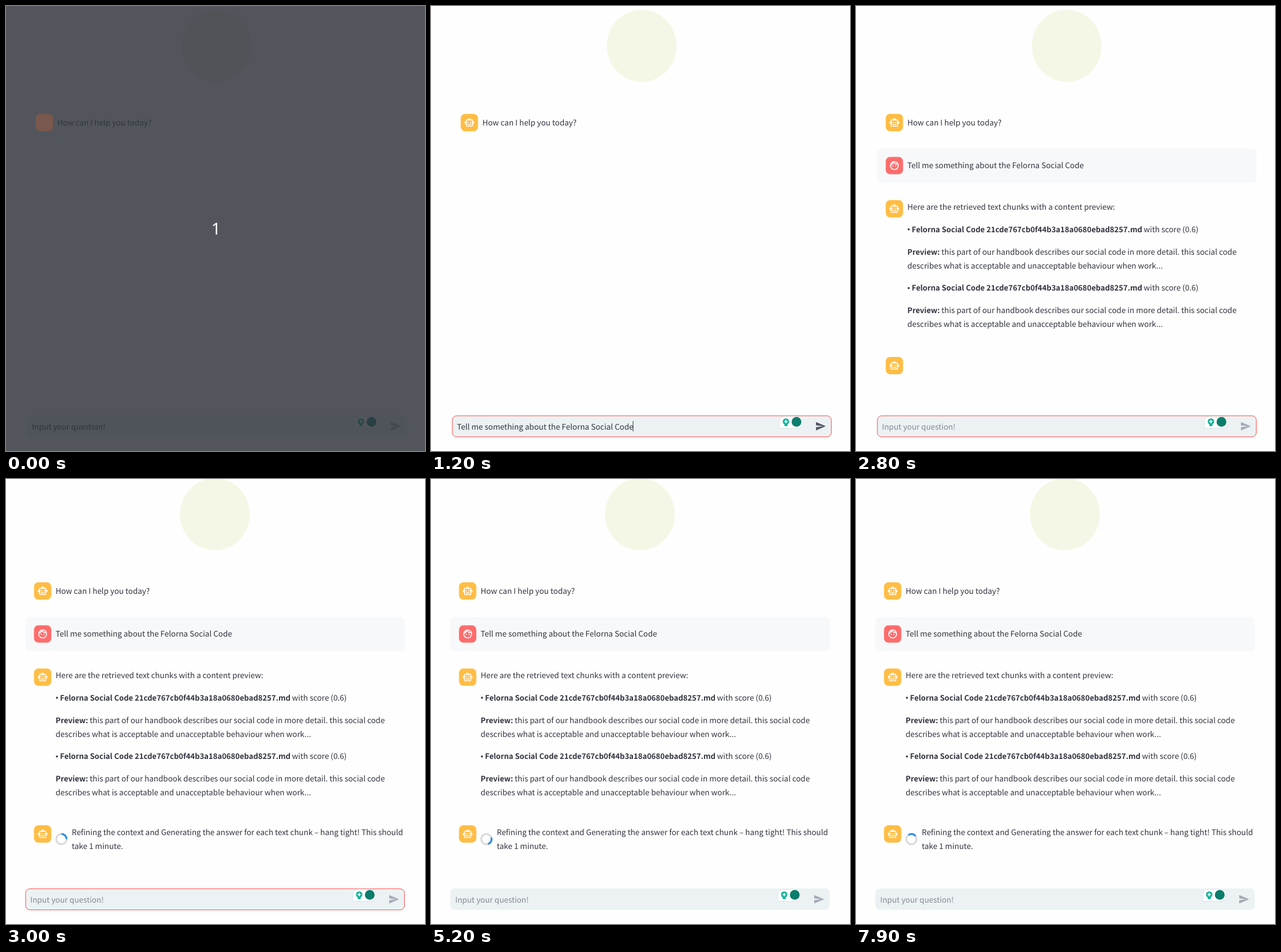
Write an HTML page that moves like this. It is 726 px wide and 771 px high and loops after 8 s.

```html
<!DOCTYPE html>
<html lang="en">
<head>
<meta charset="utf-8">
<title>Chat assistant</title>
<style>
  html, body { margin: 0; width: 100%; height: 100%; overflow: hidden; background: #fefefe; }
  svg { display: block; width: 726px; height: 771px; }
  text {
    font: 13.43px "Noto Sans CJK SC", "Noto Sans CJK JP", "Noto Sans CJK", "Noto Sans", sans-serif;
    fill: #31333f;
    text-rendering: geometricPrecision;
    white-space: pre;
  }
  .bold { font-size: 13.05px; font-weight: 700; }
  .hint { fill: #858994; }
  .count { font: 500 28.5px "Noto Sans", sans-serif; fill: #fff; text-anchor: middle; }

  /* One 8 s timeline: 1.25% is 100 ms. */
  .timed { animation: 8s step-end infinite; }
  .veil { animation-name: veil; }
  .page { animation-name: page; }
  .scroll { animation-name: scroll; }
  .focus { animation-name: focus; }
  .empty { animation-name: empty; }
  .filled { animation-name: filled; }
  .caret { animation-name: caret; }
  .asked { animation-name: asked; }
  .thinking { animation-name: thinking; }
  .chunks { animation-name: chunks; }
  .answer { animation-name: answer; }
  .refining { animation-name: refining; }
  .spin { animation: spin 1s steps(10) infinite; transform-origin: 99px 632px; }

  @keyframes veil { 0% { opacity: 1 } 1.25%, 100% { opacity: 0 } }
  @keyframes page { 0% { transform: none } 36.25%, 100% { transform: translateX(-3px) } }
  @keyframes scroll { 0% { transform: none } 37.5%, 100% { transform: translateY(-8px) } }
  @keyframes focus {
    0% { opacity: 0 } 6.25% { opacity: .35 } 7.5% { opacity: .75 } 8.75% { opacity: 1 }
    52.5% { opacity: .7 } 53.75% { opacity: .3 } 55%, 100% { opacity: 0 }
  }
  @keyframes empty { 0% { opacity: 1 } 12.5% { opacity: 0 } 26.25%, 100% { opacity: 1 } }
  @keyframes filled { 0% { opacity: 0 } 12.5% { opacity: 1 } 26.25%, 100% { opacity: 0 } }
  @keyframes caret {
    0% { opacity: 0; transform: none }
    6.25% { opacity: 1; transform: none }
    12.5% { opacity: 1; transform: translateX(305px) }
    18.75% { opacity: 0; transform: translateX(305px) }
    25% { opacity: 1; transform: translateX(305px) }
    26.25% { opacity: 1; transform: none }
    32.5% { opacity: 0; transform: none }
    38.75% { opacity: 1; transform: none }
    45% { opacity: 0; transform: none }
    51.25% { opacity: 1; transform: none }
    52.5%, 100% { opacity: 0; transform: none }
  }
  @keyframes asked { 0% { opacity: 0 } 26.25%, 100% { opacity: 1 } }
  @keyframes thinking { 0% { opacity: 0 } 28.75%, 100% { opacity: 1 } }
  @keyframes chunks { 0% { opacity: 0 } 32.5%, 100% { opacity: 1 } }
  @keyframes answer { 0% { opacity: 0 } 33.75%, 100% { opacity: 1 } }
  @keyframes refining { 0% { opacity: 0 } 36.25%, 100% { opacity: 1 } }
  @keyframes spin { from { transform: rotate(45deg) } to { transform: rotate(405deg) } }
</style>
</head>
<body>
<svg viewBox="0 0 726 771">
  <defs>
    <g id="bot">
      <rect x="-15" y="-15" width="30" height="30" rx="7.5" fill="#ffbd45"/>
      <g transform="scale(.77) translate(-12 -12)" fill="#fff">
        <path d="M20 9V7c0-1.1-.9-2-2-2h-3c0-1.66-1.34-3-3-3S9 3.34 9 5H6c-1.1 0-2 .9-2 2v2c-1.66 0-3 1.34-3 3s1.34 3 3 3v4c0 1.1.9 2 2 2h12c1.1 0 2-.9 2-2v-4c1.66 0 3-1.34 3-3s-1.34-3-3-3zm-2 10H6V7h12z"/>
        <circle cx="9" cy="11.5" r="1.5"/>
        <circle cx="15" cy="11.5" r="1.5"/>
        <path d="M8 15h8v2H8z"/>
      </g>
    </g>
    <g id="person">
      <rect x="-15" y="-15" width="30" height="30" rx="7.5" fill="#ff6c6c"/>
      <g transform="scale(.77) translate(-12 -12)" fill="none" stroke="#fff" stroke-width="2">
        <circle cx="12" cy="12" r="9"/>
        <path d="M3.5 11Q8.5 9 10 4Q13 9.5 20.5 9"/>
        <g fill="#fff" stroke="none"><circle cx="9" cy="13" r="1.3"/><circle cx="15" cy="13" r="1.3"/></g>
      </g>
    </g>
    <g id="chunk">
      <circle cx="91.3" cy="387" r="1.8" fill="#31333f"/>
      <text x="96.5" y="391.5" class="bold">Felorna Social Code 21cde767cb0f44b3a18a0680ebad8257.md</text>
      <text x="498.5" y="391.5">with score (0.6)</text>
      <text x="89" y="430.5" class="bold">Preview:</text>
      <text x="148" y="430.5">this part of our handbook describes our social code in more detail. this social code</text>
      <text x="89" y="454.7">describes what is acceptable and unacceptable behaviour when work...</text>
    </g>
    <path id="send" d="M2 3L23 12L2 21V14L17 12L2 10Z" transform="translate(665.4 718.4) scale(.81)"/>
  </defs>

  <rect width="726" height="771" fill="#fefefe"/>

  <g class="timed page">
    <g class="timed scroll">
      <ellipse cx="365" cy="69" rx="60.5" ry="62.5" fill="#f5f7e6"/>

      <use href="#bot" x="66.5" y="202"/>
      <text x="89" y="206.5">How can I help you today?</text>

      <g class="timed asked">
        <rect x="36.5" y="247" width="657.5" height="59.5" rx="7.5" fill="#f7f8f9"/>
        <use href="#person" x="66.5" y="276.5"/>
        <text x="89" y="281.3">Tell me something about the Felorna Social Code</text>
      </g>

      <use class="timed thinking" href="#bot" x="66.5" y="351.3"/>
      <g class="timed chunks">
        <text x="89" y="353.3">Here are the retrieved text chunks with a content preview:</text>
        <use href="#chunk"/>
        <use href="#chunk" y="101.7"/>
      </g>

      <use class="timed answer" href="#bot" x="66.5" y="623"/>
      <g class="timed refining">
        <g class="spin" fill="none" stroke-width="2.8">
          <circle cx="99" cy="632" r="9" stroke="#d6d6d9"/>
          <path d="M92.64 625.64A9 9 0 0 1 105.36 625.64" stroke="#1c83e1"/>
        </g>
        <text x="117" y="625">Refining the context and Generating the answer for each text chunk – hang tight! This should</text>
        <text x="117" y="649">take 1 minute.</text>
      </g>
    </g>

    <rect x="36.5" y="709.5" width="657.5" height="37" rx="7.5" fill="#ecf2f3"/>
    <rect class="timed focus" x="37" y="710" width="656.5" height="36.5" rx="7.5" fill="none" stroke="#ff4b4b"/>
    <g class="timed empty">
      <text x="45" y="733.5" class="hint">Input your question!</text>
      <use href="#send" fill="#a3a8b4"/>
    </g>
    <g class="timed filled">
      <text x="45" y="733.5">Tell me something about the Felorna Social Code</text>
      <use href="#send" fill="#555867"/>
    </g>
    <rect class="timed caret" x="44.6" y="719" width="1" height="18" fill="#31333f"/>

    <path d="M604 731.5V720q0-9 9-9h22q9 0 9 9v2.5q0 9-9 9z" fill="#fff" stroke="#d9dfe2" stroke-width=".8"/>
    <g fill="#12b39b">
      <circle cx="615" cy="720" r="5.6"/>
      <path d="M612.5 724h5v4h-5z"/>
      <path d="M615 717v6M612 720h6" stroke="#fff" stroke-width="1.6"/>
    </g>
    <circle cx="633.3" cy="720.5" r="8.5" fill="#0b7d6c"/>
  </g>

  <g class="timed veil">
    <rect width="726" height="771" fill="#2f343c" fill-opacity=".83"/>
    <rect x="51.5" y="187" width="30" height="30" rx="7.5" fill="#855c54" fill-opacity=".8"/>
    <text x="45" y="733.5" fill-opacity=".8">Input your question!</text>
    <text x="364" y="395.5" class="count">1</text>
  </g>
</svg>
</body>
</html>
```
